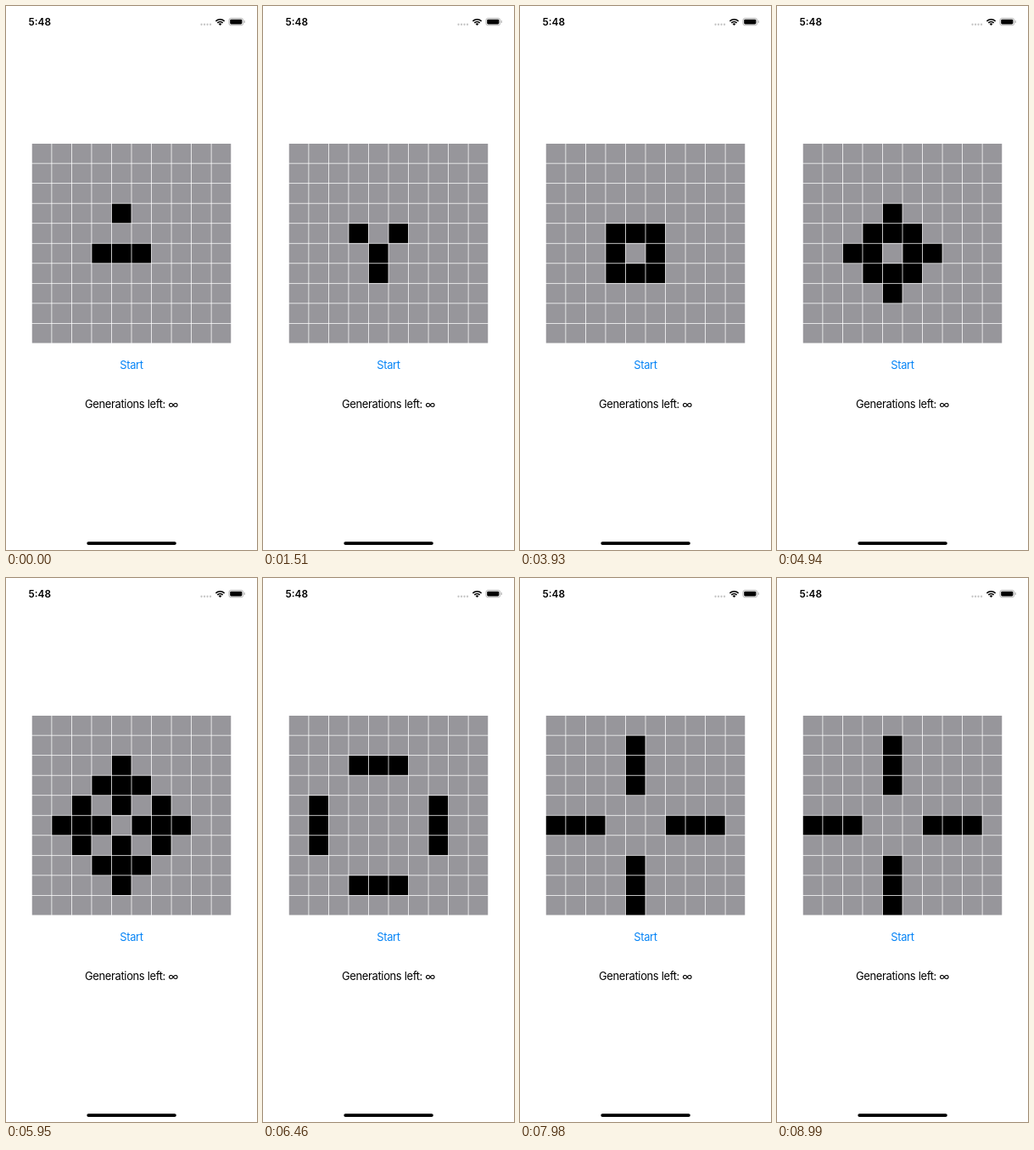
Animation of 296 by 640 pixels, one loop 9290 ms. Source, as an HTML page with a canvas:

```html
<!DOCTYPE html>
<html lang="en">
<head>
<meta charset="utf-8">
<title>Game of Life</title>
<style>
  html, body { margin: 0; width: 100%; height: 100%; overflow: hidden; background: #fff; }
  canvas { display: block; width: 296px; height: 640px; }
</style>
</head>
<body>
<canvas id="stage"></canvas>
<script>
const W = 296, H = 640, LOOP = 9290;
const SIZE = 10, LEFT = 30.74, TOP = 162, PITCH = 23.528, CELL = 22.77;
const GRAY = '#97969b', BLUE = '#0684f6';
const STEPS = [1510, 1920, 2420, 2930, 3430, 3930, 4440, 4940, 5440,
  5950, 6460, 6970, 7480, 7980, 8490, 8990];
const SEED = [[4, 3], [3, 5], [4, 5], [5, 5]];
const FONT = 'Inter, "Liberation Sans", sans-serif';

const canvas = document.getElementById('stage');
const dpr = window.devicePixelRatio || 1;
canvas.width = W * dpr;
canvas.height = H * dpr;
const ctx = canvas.getContext('2d');
ctx.scale(dpr, dpr);

const alive = (grid, x, y) =>
  x >= 0 && y >= 0 && x < SIZE && y < SIZE && grid[y * SIZE + x] ? 1 : 0;

function evolve(grid) {
  return grid.map((cell, i) => {
    const x = i % SIZE, y = Math.floor(i / SIZE);
    let n = -cell;
    for (let dy = -1; dy <= 1; dy++)
      for (let dx = -1; dx <= 1; dx++) n += alive(grid, x + dx, y + dy);
    return n === 3 || (cell && n === 2) ? 1 : 0;
  });
}

const first = new Array(SIZE * SIZE).fill(0);
for (const [x, y] of SEED) first[y * SIZE + x] = 1;
const generations = [first];
for (let i = 0; i < STEPS.length; i++) generations.push(evolve(generations[i]));

function pill(x, y, w, h, r, color) {
  ctx.fillStyle = color;
  ctx.beginPath();
  ctx.roundRect(x, y, w, h, r);
  ctx.fill();
}

function label(text, x, y, size, { weight = 400, color = '#000', spacing = 0 } = {}) {
  ctx.font = `${weight} ${size}px ${FONT}`;
  ctx.letterSpacing = spacing + 'px';
  ctx.textAlign = 'center';
  ctx.fillStyle = color;
  ctx.fillText(text, x, y);
}

function drawWifi(x, y) {
  const a = Math.PI * 0.25;
  ctx.strokeStyle = ctx.fillStyle = '#000';
  ctx.lineWidth = 1.6;
  for (const r of [4.5, 7.2]) {
    ctx.beginPath();
    ctx.arc(x, y, r, -Math.PI / 2 - a, -Math.PI / 2 + a);
    ctx.stroke();
  }
  ctx.beginPath();
  ctx.moveTo(x, y);
  ctx.arc(x, y, 2.7, -Math.PI / 2 - a, -Math.PI / 2 + a);
  ctx.fill();
}

function drawStatus() {
  label('5:48', 39.8, 23, 11.8, { weight: 600 });
  for (let i = 0; i < 4; i++) pill(229.4 + i * 3.5, 20.6, 2.3, 2.3, 1.15, '#c4c4c4');
  drawWifi(252.5, 23);
  ctx.strokeStyle = '#a6a6a6';
  ctx.lineWidth = 0.8;
  ctx.beginPath();
  ctx.roundRect(262.9, 14.4, 16.8, 8.3, 2.4);
  ctx.stroke();
  pill(264.2, 15.7, 14.2, 5.7, 1.3, '#000');
  pill(280.7, 17.1, 1, 3, 0.5, '#a6a6a6');
}

function drawGrid(grid) {
  grid.forEach((cell, i) => {
    ctx.fillStyle = cell ? '#000' : GRAY;
    ctx.fillRect(LEFT + (i % SIZE) * PITCH, TOP + Math.floor(i / SIZE) * PITCH, CELL, CELL);
  });
}

function draw(t) {
  ctx.fillStyle = '#fff';
  ctx.fillRect(0, 0, W, H);
  drawStatus();
  drawGrid(generations[STEPS.filter(s => s <= t).length]);
  label('Start', 148, 427, 12.9, { color: BLUE, spacing: -0.31 });
  label('Generations left: ∞', 148, 472.7, 12.9, { spacing: -0.31 });
  pill(95.3, 630.2, 105.5, 3.8, 1.9, '#000');
}

const start = performance.now();
function tick() {
  draw((performance.now() - start) % LOOP);
  requestAnimationFrame(tick);
}
tick();
</script>
</body>
</html>
```
